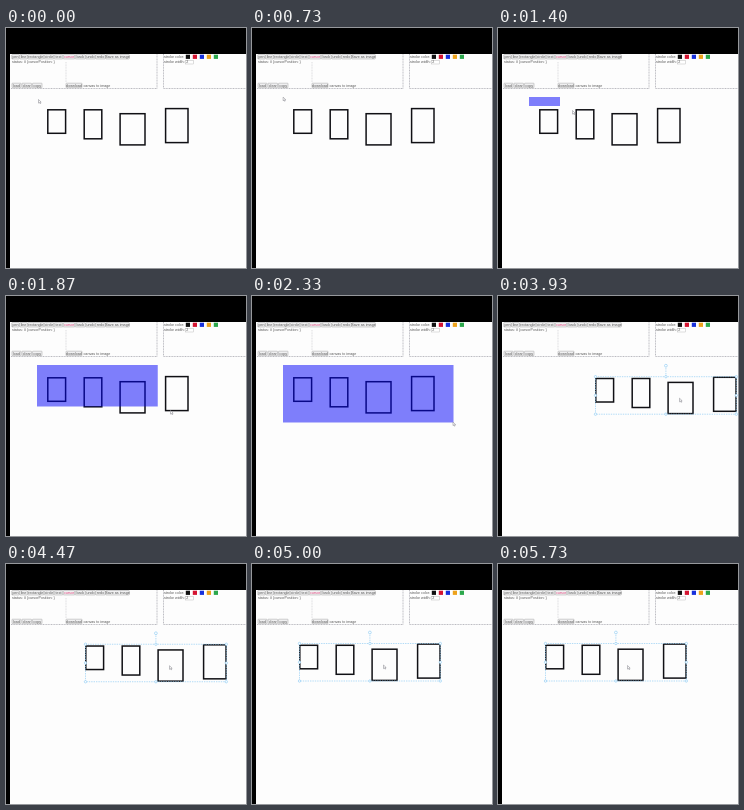
Recreate the animation shown at these times as an HTML page. Size 240x240 px, loop 5790 ms.

```html
<!DOCTYPE html>
<html lang="en">
<head>
<meta charset="utf-8">
<title>Drawing tool</title>
<style>
  html, body { margin: 0; width: 100%; height: 100%; overflow: hidden; background: #000; }
  svg { display: block; width: 100%; height: 100%; }
  text { font: 3.7px "Liberation Sans", Arial, sans-serif; fill: #555; }
  .active { fill: #e0407c; }
  .panel { fill: none; stroke: #a0a0a8; stroke-width: .7; stroke-dasharray: 1 .6; }
  .button { fill: #f0f0f1; stroke: #999; stroke-width: .45; }
  .shapes rect { fill: none; stroke: #101014; stroke-width: 1.5; }
  .frame { fill: none; stroke: #92cdf4; stroke-width: .7; stroke-dasharray: 1.4 1; }
  .handle { fill: #fdfeff; stroke: #86c8f2; stroke-width: .6; }
  #marquee { fill: rgba(0, 0, 250, .5); }
  #pointer path { fill: #fff; stroke: #808088; stroke-width: .5; }
</style>
</head>
<body>
<svg viewBox="0 0 240 240">
  <rect width="240" height="240"/>
  <rect x="4" y="26" width="236" height="214" fill="#fdfdfd"/>

  <path class="panel" d="M5 60.5H151V26M157.5 26V60.5H240"/>
  <path class="panel" d="M60 34V54" opacity=".5"/>
  <g id="toolbar"></g>
  <text x="6" y="35.2" textLength="auto">status: # {cursorPosition: }</text>
  <text x="158" y="30.2">stroke color:</text>
  <text x="158" y="35.2">stroke width:</text>
  <rect x="179.3" y="32.2" width="8" height="3.8" fill="#fff" stroke="#aaa" stroke-width=".4"/>
  <text x="180.3" y="35.4">2</text>
  <g id="swatches"></g>

  <g id="drawing">
    <g class="shapes">
      <rect x="41.8" y="81.8" width="17.8" height="23.5"/>
      <rect x="78.2" y="81.8" width="17.6" height="29"/>
      <rect x="114.1" y="85.7" width="24.9" height="31.2"/>
      <rect x="159.6" y="80.6" width="22.4" height="34"/>
    </g>
    <g id="selection">
      <path class="frame" d="M41.5 80H182.3V117.5H41.5ZM111.9 80V69"/>
      <g id="handles"></g>
    </g>
  </g>
  <rect id="marquee" x="31" y="69"/>
  <g id="pointer"><path d="M0 0V3.6L.9 2.9 1.5 4.2 2.1 3.9 1.5 2.6H2.7Z"/></g>
</svg>
<script>
  const $ = id => document.getElementById(id);
  const add = (parent, tag, attrs, text) => {
    const el = document.createElementNS("http://www.w3.org/2000/svg", tag);
    for (const name in attrs) el.setAttribute(name, attrs[name]);
    if (text) el.textContent = text;
    parent.append(el);
  };

  function button(label, x, y, width, active) {
    add($("toolbar"), "rect", { class: "button", x, y, width, height: 4.5, rx: .5 });
    add($("toolbar"), "text", {
      x: x + width / 2, y: y + 3.4, "text-anchor": "middle", class: active ? "active" : ""
    }, label);
  }

  const tools = [
    ["pen", 8], ["line", 8], ["rectangle", 16.5], ["circle", 10], ["text", 9],
    ["cursor", 12], ["back", 10.5], ["undo", 10], ["redo", 10], ["Save as image", 24]
  ];
  let left = 5.8;
  for (const [label, width] of tools) {
    button(label, left, 26.5, width - .5, label === "cursor");
    left += width;
  }
  button("load", 6, 55.2, 9);
  button("clear", 16, 55.2, 9.5);
  button("copy", 26.5, 55.2, 9.5);
  button("download", 60, 55.2, 16);
  add($("toolbar"), "text", { x: 77.5, y: 58.7 }, "canvas to image");

  ["#111", "#d41431", "#1730dc", "#eda21b", "#2ca84c"].forEach((fill, i) =>
    add($("swatches"), "rect", { x: 179.8 + i * 7, y: 26.7, width: 4.2, height: 4.2, fill }));

  for (const x of [41.5, 111.9, 182.3])
    for (const y of [80, 98.7, 117.5])
      if (x !== 111.9 || y !== 98.7)
        add($("handles"), "circle", { class: "handle", cx: x, cy: y, r: 1.2 });
  add($("handles"), "circle", { class: "handle", cx: 111.9, cy: 69, r: 1.4 });

  // Each key is [step, x, y].
  const LOOP = 5790, STEP = 200 / 3;
  const PRESS = 16, RELEASE = 37, GRAB = 48, DROP = 78;
  const pointerKeys = [
    [0, 33, 72], [8, 32, 70], [16, 31, 69], [18, 38, 71], [20, 62, 78],
    [21, 75, 83], [24, 112, 97], [28, 165, 115], [32, 199, 125.5],
    [34, 201.5, 126.5], [38, 201.5, 126.5], [44, 116, 99.5], [47, 126, 102],
    [49, 126, 102], [59, 182, 102.7], [62, 184, 102.7], [75, 132, 101.5],
    [80, 132, 101.5], [86, 130, 102]
  ];

  function at(step) {
    const next = Math.max(1, pointerKeys.findIndex(key => key[0] >= step));
    const [s0, x0, y0] = pointerKeys[next - 1];
    const [s1, x1, y1] = pointerKeys[next];
    const p = (step - s0) / (s1 - s0);
    return [x0 + (x1 - x0) * p, y0 + (y1 - y0) * p];
  }

  const place = (id, x, y) => $(id).setAttribute("transform", `translate(${x} ${y})`);
  const show = (id, on) => $(id).setAttribute("visibility", on ? "visible" : "hidden");

  function draw(now) {
    const step = Math.min(86, Math.floor((now % LOOP + 4) / STEP));
    const [x, y] = at(step);
    place("pointer", x - .5, y - .5);

    // The marquee trails the pointer by one step.
    const [mx, my] = at(Math.max(PRESS, step - 1));
    $("marquee").setAttribute("width", Math.max(0, mx - 31));
    $("marquee").setAttribute("height", Math.max(0, my - 69));
    show("marquee", step > PRESS && step < RELEASE);

    const [gx, gy] = at(Math.min(DROP, Math.max(GRAB, step)));
    place("drawing", gx - 126, gy - 102);
    show("selection", step >= RELEASE);
    requestAnimationFrame(draw);
  }
  requestAnimationFrame(draw);
</script>
</body>
</html>
```
